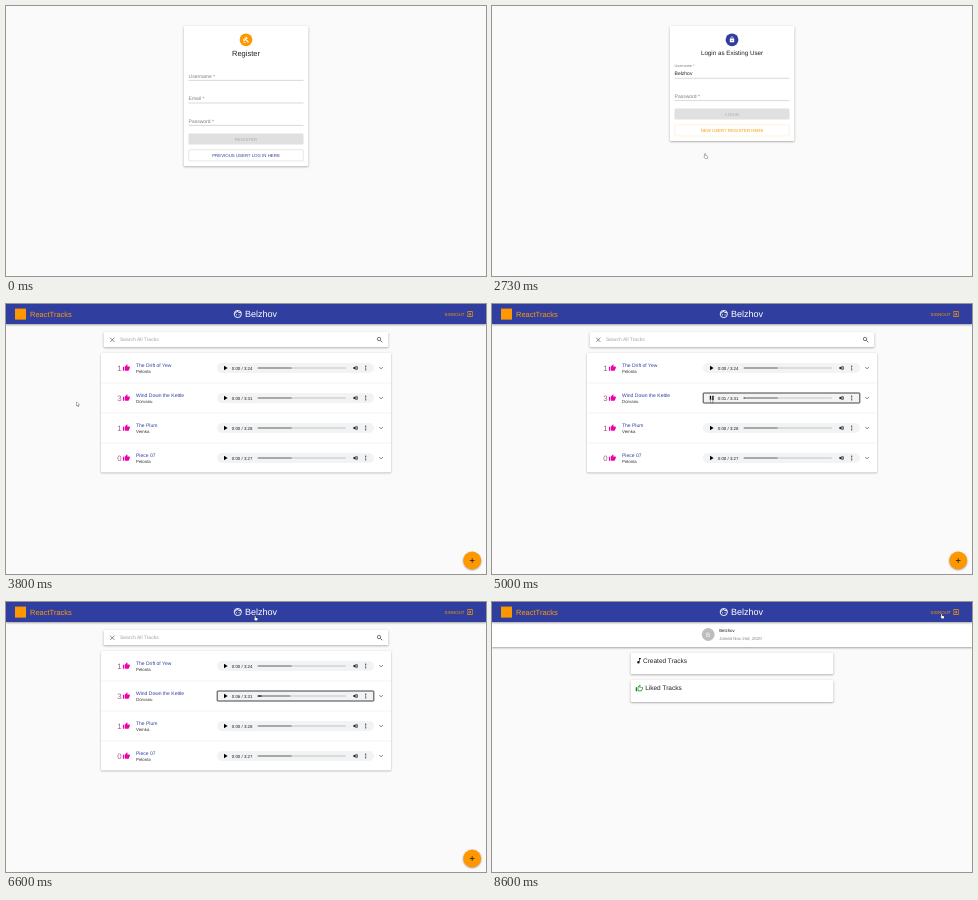
An HTML page with a canvas for the animation above (8.79 s loop, 480x270 px).

```html
<!DOCTYPE html>
<html lang="en">
<head>
<meta charset="utf-8">
<title>ReactTracks demo</title>
<style>
html, body { margin: 0; width: 100%; height: 100%; overflow: hidden; background: #fafafa; }
canvas { display: block; width: 480px; height: 270px; }
</style>
</head>
<body>
<canvas id="stage"></canvas>
<script>
const LOOP = 8790;
const INDIGO = '#303f9f', ORANGE = '#ff9800', INK = '#212121', GREY = '#7d7d7d', PINK = '#f000a8';
const USER = 'Belzhov';
const TRACKS = [
  [1, 'The Drift of Yew', 'Pelonta', '3:24'],
  [3, 'Wind Down the Kettle', 'Dorvanu', '3:31'],
  [1, 'The Plum', 'Vemka', '3:28'],
  [0, 'Piece 07', 'Pelonta', '3:27']
];

const ICONS = {
  gavel: 'M1 21h12v2H1zM5.2 8.1l2.9-2.9 14.1 14.2-2.8 2.8zM12.3 1l5.7 5.7-2.9 2.8-5.6-5.7zM3.8 9.5l5.7 5.6-2.9 2.9L1 12.3z',
  lock: 'M18 8h-1V6A5 5 0 007 6v2H6a2 2 0 00-2 2v10a2 2 0 002 2h12a2 2 0 002-2V10a2 2 0 00-2-2zm-6 9a2 2 0 110-4 2 2 0 010 4zm3.1-9H8.9V6a3.1 3.1 0 016.2 0z',
  thumb: 'M1 21h4V9H1zM23 10a2 2 0 00-2-2h-6.3l1-4.9-.5-1L14.2 1 7.6 7.6A2 2 0 007 9v10a2 2 0 002 2h9a2 2 0 001.8-1.2l3-7.1.2-.7z',
  thumbLine: 'M9 21h9a2 2 0 001.8-1.2l3-7.1.2-.7v-2a2 2 0 00-2-2h-6.3l1-4.9-.5-1L14.2 1 7.6 7.6A2 2 0 007 9v10a2 2 0 002 2zM9 9l4.3-4.3L12 10h9v2l-3 7H9zM1 9h4v12H1z',
  volume: 'M3 9v6h4l5 5V4L7 9zm13.5 3A4.5 4.5 0 0014 8v8a4.5 4.5 0 002.5-4zM14 3.2v2.1a7 7 0 010 13.4v2.1a9 9 0 000-17.6z',
  note: 'M12 3v10.6A4 4 0 1014 17V7h4V3z',
  exit: 'M10.1 15.6L11.5 17l5-5-5-5-1.4 1.4 2.6 2.6H3v2h9.7zM19 3H5a2 2 0 00-2 2v4h2V5h14v14H5v-4H3v4a2 2 0 002 2h14a2 2 0 002-2V5a2 2 0 00-2-2z',
  hand: 'M7 2a2 2 0 014 0v8l8 2a3 3 0 012 3l-2 8H9l-6-8 2-2 2 2z',
  arrow: 'M4 1v18l4-4 3 7 3-1-3-7h6z'
};
for (const k in ICONS) ICONS[k] = new Path2D(ICONS[k]);

const canvas = document.getElementById('stage');
const ctx = canvas.getContext('2d');
const ratio = Math.max(1, window.devicePixelRatio || 1);
canvas.width = 480 * ratio;
canvas.height = 270 * ratio;

function rect(x, y, w, h, fill, r = 0) {
  ctx.beginPath();
  ctx.roundRect(x, y, w, h, r);
  ctx.fillStyle = fill;
  ctx.fill();
}

function frame(x, y, w, h, color, width = 0.4, r = 1.2) {
  ctx.beginPath();
  ctx.roundRect(x, y, w, h, r);
  ctx.strokeStyle = color;
  ctx.lineWidth = width;
  ctx.stroke();
}

function paper(x, y, w, h, fill = '#fff', r = 1.2) {
  ctx.save();
  ctx.shadowColor = 'rgba(0,0,0,.36)';
  ctx.shadowBlur = 2 * ratio;
  ctx.shadowOffsetY = 0.7 * ratio;
  rect(x, y, w, h, fill, r);
  ctx.restore();
}

function disc(x, y, r, fill) {
  ctx.beginPath();
  ctx.arc(x, y, r, 0, 7);
  ctx.fillStyle = fill;
  ctx.fill();
}

function line(color, width, ...p) {
  ctx.beginPath();
  for (let i = 0; i < p.length; i += 2) ctx.lineTo(p[i], p[i + 1]);
  ctx.strokeStyle = color;
  ctx.lineWidth = width;
  ctx.stroke();
}

// y is the middle of the capitals
function text(s, x, y, size, color, align = 'left', weight = 400) {
  ctx.font = `${weight} ${size}px "Liberation Sans", Arial, sans-serif`;
  ctx.textAlign = align;
  ctx.fillStyle = color;
  ctx.fillText(s, x, y + size * 0.35);
}

function icon(name, x, y, size, color, edge) {
  ctx.save();
  ctx.translate(x - size / 2, y - size / 2);
  ctx.scale(size / 24, size / 24);
  if (edge) {
    ctx.strokeStyle = edge;
    ctx.lineWidth = 3;
    ctx.stroke(ICONS[name]);
  }
  ctx.fillStyle = color;
  ctx.fill(ICONS[name], 'evenodd');
  ctx.restore();
}

function field(label, value, y, focus) {
  const small = focus || value;
  const tone = focus ? INDIGO : GREY;
  text(label + ' *', 182.6, small ? y - 12.2 : y - 4.4, small ? 3.75 : 5, tone);
  if (value) text(value, 182.6, y - 4.8, 5, INK);
  line(focus ? INDIGO : '#a0a0a0', focus ? 0.8 : 0.4, 182.5, y, 297.5, y);
}

function button(label, y, fill, color, border) {
  if (fill === INDIGO || fill === '#1a237e') paper(182.5, y, 115, 11, fill);
  else if (fill) rect(182.5, y, 115, 11, fill, 1.2);
  if (border) frame(182.7, y, 114.6, 11.2, border);
  text(label, 240, y + 5.6, 4.375, color, 'center');
}

function registerPage(t) {
  paper(177.8, 20, 124.6, 140.3);
  disc(240, 33.8, 6.4, ORANGE);
  icon('gavel', 240, 33.8, 7, '#fff');
  text('Register', 240, 47.2, 7.5, INK, 'center');
  field('Username', '', 74.4, t >= 1200);
  field('Email', '', 97, false);
  field('Password', '', 119.4, false);
  button('REGISTER', 127.6, '#e0e0e0', '#ababab');
  button('PREVIOUS USER? LOG IN HERE', 143.7, t >= 2400 ? '#f4f5fa' : '', INDIGO, '#c3c3cc');
}

function loginPage(t) {
  const named = t >= 2670, typed = t >= 2800;
  paper(177.8, 20, 124.6, 115);
  disc(240, 33.8, 6.4, INDIGO);
  icon('lock', 240, 33.6, 6.6, '#fff');
  text('Login as Existing User', 240, 46.4, 6.25, INK, 'center');
  field('Username', named ? USER : '', 72.3, false);
  field('Password', typed ? '•••••••' : '', 94.6, typed);
  button('LOGIN', 102.6, !typed ? '#e0e0e0' : t >= 3200 ? '#1a237e' : INDIGO, typed ? '#fff' : '#ababab');
  button('NEW USER? REGISTER HERE', 118.8, '', ORANGE, '#ffdfae');
}

function header() {
  paper(0, -2, 480, 22, INDIGO, 0);
  rect(9, 4.6, 11, 11, ORANGE);
  text('ReactTracks', 24, 10.2, 7.5, ORANGE);
  ctx.beginPath();
  ctx.arc(231.8, 10, 3.6, 0, 7);
  ctx.strokeStyle = '#fff';
  ctx.lineWidth = 0.9;
  ctx.stroke();
  ctx.beginPath();
  ctx.moveTo(228.4, 9.4);
  ctx.quadraticCurveTo(230.5, 9, 231, 7.2);
  ctx.quadraticCurveTo(232.6, 9, 235.2, 8.6);
  ctx.stroke();
  disc(230.5, 10.7, 0.55, '#fff');
  disc(233.1, 10.7, 0.55, '#fff');
  text(USER, 239, 10.2, 9, '#fff');
  text('SIGNOUT', 438.6, 10.2, 4.375, ORANGE);
  icon('exit', 464, 10.1, 7.4, ORANGE);
}

function player(y, time, total, played, loaded, paused, ring) {
  rect(211, y - 4.9, 157, 9.8, '#f1f3f4', ring ? 0.5 : 4.9);
  if (paused) {
    ctx.beginPath();
    ctx.moveTo(218, y - 2.2);
    ctx.lineTo(221.6, y);
    ctx.lineTo(218, y + 2.2);
    ctx.fillStyle = '#000';
    ctx.fill();
  } else {
    rect(217.8, y - 2.2, 1.3, 4.4, '#000');
    rect(220.3, y - 2.2, 1.3, 4.4, '#000');
  }
  text(`${time} / ${total}`, 225.8, y, 4.375, INK);
  rect(251.6, y - 0.6, 88.4, 1.2, '#c4c5c6', 0.6);
  rect(251.6, y - 0.6, loaded - 251.6, 1.2, '#777', 0.6);
  if (played) rect(251.6, y - 0.6, played, 1.2, '#000', 0.6);
  icon('volume', 349.6, y, 6.2, '#111');
  for (const d of [-1.8, 0, 1.8]) disc(359.7, y + d, 0.6, '#111');
  if (ring) frame(211.2, y - 5, 156.6, 10, '#151515', 0.8, 0.6);
}

function tracksPage(t) {
  paper(97.6, 28, 284.8, 15.2);
  line('#555', 0.7, 104.2, 33.7, 108.4, 37.9);
  line('#555', 0.7, 108.4, 33.7, 104.2, 37.9);
  text('Search All Tracks', 114, 35.6, 5, '#a3a3a3');
  ctx.beginPath();
  ctx.arc(373, 35, 1.7, 0, 7);
  ctx.strokeStyle = '#444';
  ctx.lineWidth = 0.7;
  ctx.stroke();
  line('#444', 0.8, 374.3, 36.3, 376.3, 38.3);

  paper(95, 49, 290, 119.4);
  const held = t >= 5400 && t < 5870;
  const started = t >= 5000;
  const time = t < 5000 ? '0:00' : t < 5070 ? '0:01' : t < 5400 ? '0:03' : t < 5800 ? '0:05' : '0:06';
  TRACKS.forEach(([likes, title, artist, total], i) => {
    const top = 49 + i * 30, y = top + 15, own = i === 1;
    if (own && held) rect(95, top, 290, 30, t < 5800 ? '#d0d0d0' : '#e6e6e6');
    if (i) line('#dedede', 0.4, 95, top, 385, top);
    text(likes, 115.6, y, 7.8, '#a0608f', 'right');
    icon('thumb', 120.4, y - 0.2, 7.6, PINK);
    text(title, 130, y - 3.2, 5, INDIGO);
    text(artist, 130, y + 3.6, 4.375, '#333');
    if (own && started) {
      player(y, time, total, t < 5070 ? 1 : t < 5400 ? 2.5 : 4.2, t < 5400 ? 286 : t < 6600 ? 288 : 284.5, t >= 5800, true);
    } else {
      player(y, '0:00', total, 0, 285.8, true, false);
    }
    line('#666', 0.8, 373.3, y - 1, 375.1, y + 0.9, 376.9, y - 1);
  });

  paper(457.2, 247.5, 18, 18, ORANGE, 9);
  line('#222', 0.8, 463.9, 256.5, 468.5, 256.5);
  line('#222', 0.8, 466.2, 254.2, 466.2, 258.8);
}

function profilePage() {
  paper(0, 20, 480, 25, '#fff', 0);
  disc(216.2, 32.5, 6.4, '#bdbdbd');
  text(USER[0], 216.2, 32.6, 6.25, '#fff', 'center');
  text(USER, 227.2, 28.8, 4.375, INK);
  text('Joined Nov 2nd, 2020', 227.2, 36.2, 4.375, '#858585');
  paper(138.6, 50.4, 202.8, 21.8);
  icon('note', 147, 58.8, 7.4, '#111');
  text('Created Tracks', 151, 58.8, 6.5, INK);
  paper(138.6, 78, 202.8, 22);
  icon('thumbLine', 147.3, 86.2, 7.8, '#108510');
  text('Liked Tracks', 153.2, 86.2, 6.5, INK);
}

const outEase = p => 1 - (1 - p) ** 2;
const lateEase = p => p ** 5;
const inOut = p => p * p * (3 - 2 * p);

// start, end, from x/y, to x/y, easing; the pointer rests at the last point
const MOVES = [
  [200, 1000, 38, 9, 197, 70, outEase],
  [1200, 2400, 197, 70, 211, 139, lateEase],
  [2600, 3200, 213, 148, 270, 107, inOut],
  [3800, 3800, 71, 98, 71, 98, outEase],
  [4000, 4600, 71, 98, 219, 95, outEase],
  [6000, 6600, 219, 95, 249, 14, inOut],
  [7000, 8200, 249, 14, 449.5, 12, inOut]
];

function pointer(t) {
  const move = MOVES.filter(m => t >= m[0]).pop();
  if (!move) return;
  const [a, b, x0, y0, x1, y1, ease] = move;
  const tick = Math.floor(t / 200) * 200;
  const p = b > a ? Math.min(1, Math.max(0, (tick - a) / (b - a))) : 1;
  const k = ease(p), x = x0 + (x1 - x0) * k, y = y0 + (y1 - y0) * k;
  if (t >= 1000 && t < 2200) {
    line('#333', 0.5, x, y - 2.3, x, y + 2.3);
    line('#333', 0.4, x - 0.9, y - 2.4, x + 0.9, y - 2.4);
    line('#333', 0.4, x - 0.9, y + 2.4, x + 0.9, y + 2.4);
    return;
  }
  const link = (t >= 2400 && t < 2800) || (t >= 3200 && t < 3800) || (t >= 6600 && t < 7200) || t >= 8000;
  if (link) icon('hand', x + 0.8, y + 2.2, 5, '#fff', '#222');
  else icon('arrow', x + 1.2, y + 2.4, 5, '#fff', '#222');
}

function draw(t) {
  ctx.setTransform(ratio, 0, 0, ratio, 0, 0);
  ctx.textRendering = 'geometricPrecision';
  rect(0, 0, 480, 270, '#fafafa');
  if (t < 2600) registerPage(t);
  else if (t < 3800) loginPage(t);
  else {
    if (t < 7000) tracksPage(t);
    else profilePage();
    header();
  }
  pointer(t);
}

const begin = performance.now();
function tick() {
  draw((performance.now() - begin) % LOOP);
  requestAnimationFrame(tick);
}
tick();
</script>
</body>
</html>
```
